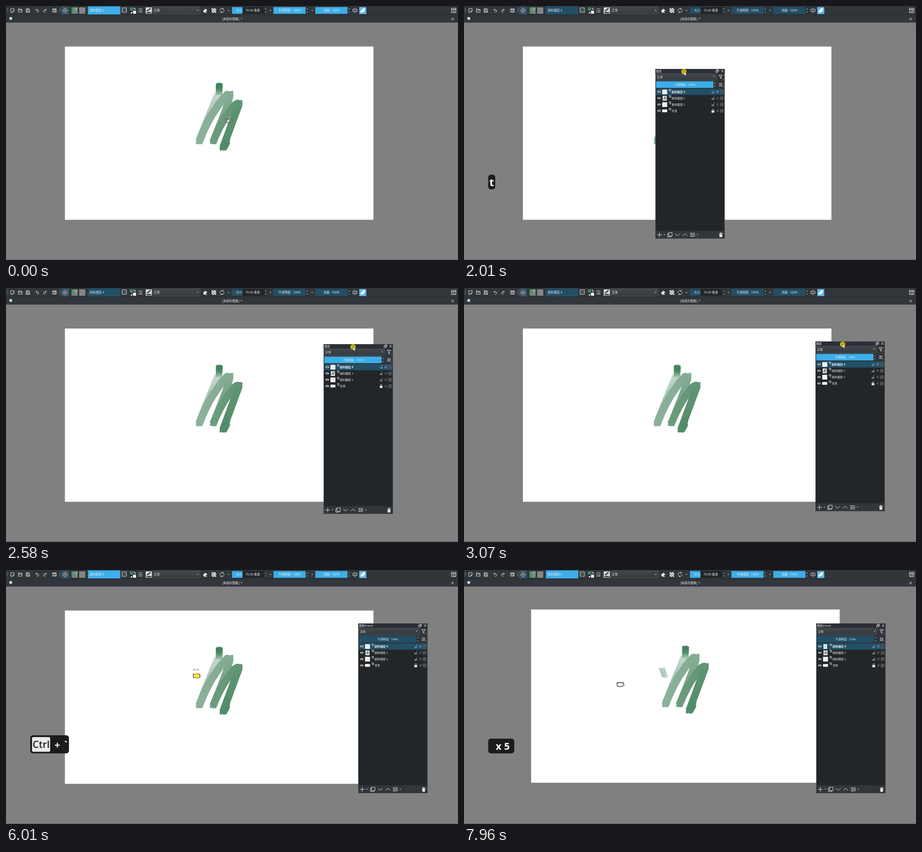
Recreate the animation shown at these times as an HTML page. Size 998 by 561 pixels, loop 8000 ms.

```html
<!DOCTYPE html>
<html lang="zh">
<head>
<meta charset="utf-8">
<style>
html,body{margin:0;width:100%;height:100%;overflow:hidden;background:#808080}
svg{display:block;width:100vw;height:100vh}
text{font-family:"Open Sans","Noto Sans CJK SC","Noto Sans CJK",sans-serif;font-size:6.6px;fill:#eff0f1;white-space:pre}
.i{fill:none;stroke:#e6e7e8;stroke-width:1}
.m{text-anchor:middle}
.s text{font-size:6.1px}
#keys text{font-weight:700;font-size:22px;fill:#fff}
#keys .cap{fill:#222;font-size:21.7px;font-weight:600}
</style>
</head>
<body>
<svg id="stage" viewBox="0 0 998 561" preserveAspectRatio="none"></svg>
<script>
const LOOP = 8000, DIM = '#224f66', LIT = '#3daee9';

let seed = 7;
const rnd = () => (seed = seed * 16807 % 2147483647) / 2147483647;

const rect = (x, y, w, h, fill, more = '') =>
  `<rect x="${x}" y="${y}" width="${w}" height="${h}" fill="${fill}" ${more}/>`;
const icon = (d, more = '') => `<path class="i" d="${d}" ${more}/>`;
const solid = (d, fill = '#e6e7e8', more = '') => `<path d="${d}" fill="${fill}" ${more}/>`;
const text = (x, y, s, more = '') => `<text x="${x}" y="${y}" ${more}>${s}</text>`;
const at = (x, y, s, more = '') => `<g transform="translate(${x} ${y})" ${more}>${s}</g>`;
const caret = (x, y, r = 2) => solid(`M${x - r} ${y - r / 2}h${2 * r}l${-r} ${r}z`, '#c8cacc');
const spinner = (x, y) => rect(x - 3, y - 7.5, 6, 15, '#2b3035') +
  solid(`M${x - 1.8} ${y - 2.6}l1.8 -2.2 1.8 2.2zM${x - 1.8} ${y + 2.6}l1.8 2.2 1.8 -2.2z`, '#b9bcbf');
const combo = (x, y, w, h) => rect(x, y, w, h, 'url(#combo)', 'rx="1.5" stroke="#5b6065" stroke-width=".7"');
const grip = x => icon(`M${x - 1} 5v10M${x + 1} 5v10`, 'stroke-dasharray="1 1" opacity=".45"');

function checker(x, y, cell, n, fill) {
  let d = '';
  for (let r = 0; r < n; r++)
    for (let c = r % 2; c < n; c += 2) d += `M${x + c * cell} ${y + r * cell}h${cell}v${cell}h${-cell}z`;
  return solid(d, fill);
}

const grad = (id, x1, y1, x2, y2, a, b, more = '') =>
  `<linearGradient id="${id}" gradientUnits="userSpaceOnUse" x1="${x1}" y1="${y1}" x2="${x2}" y2="${y2}">
   <stop offset="0" stop-color="${a}"/><stop offset="1" stop-color="${b}" ${more}/></linearGradient>`;

// A flat brush: parallel bristles with ragged ends; tall is the height of the tip.
function brush(d, paint, { half = 6.2, n = 11, width = 2.3, tall = 3 } = {}) {
  let out = '';
  for (let k = 0; k < n; k++) {
    const dx = (k / (n - 1) * 2 - 1) * half, jitter = (rnd() - .5) * 3;
    for (const side of [-tall, tall])
      out += `<path d="${d}" transform="translate(${dx.toFixed(2)} ${(jitter + side).toFixed(2)})"/>`;
  }
  return `<g fill="none" stroke="${paint}" stroke-width="${width}">${out}</g>`;
}

const defs = `<defs>
<linearGradient id="combo" x1="0" y1="0" x2="0" y2="1"><stop offset="0" stop-color="#41464b"/><stop offset="1" stop-color="#363b40"/></linearGradient>
<linearGradient id="swatch"><stop offset="0" stop-color="#468a61"/><stop offset="1" stop-color="#8f9691"/></linearGradient>
<pattern id="thumb" width="4" height="4" patternUnits="userSpaceOnUse"><rect width="4" height="4" fill="#fff"/><path d="M0 0h2v2h-2zM2 2h2v2h-2z" fill="#e3dbe1"/></pattern>
${grad('g0', 0, 178, 0, 198, '#42845c', '#6c9f80', 'stop-opacity="0"')}
${grad('g1', 0, 192, 0, 290, '#c8d9ce', '#8fb29d')}
${grad('g2', 0, 190, 0, 304, '#84ab93', '#8db19b')}
${grad('g3', 0, 190, 0, 304, '#86ad95', '#6b9c7e')}
${grad('g4', 0, 208, 0, 304, '#629575', '#6c9c7e')}
${grad('g5', 0, 208, 0, 318, '#629575', '#528c69')}
<clipPath id="reveal"><rect id="revealBox" x="408" y="210" width="30" height="0"/></clipPath>
</defs>`;

const drawing =
  brush('M468 196C461 214 443 256 426 301', 'url(#g1)') +
  brush('M471 170.500Q471 184 470 198', 'url(#g0)', { tall: 0 }) +
  brush('M426 301C437 272 448 249 462 229S484 197 494 192', 'url(#g2)') +
  brush('M494 191.500Q496 196 492 208C484 236 470 268 457 301', 'url(#g3)') +
  brush('M457 301C467 276 479 253 492 235S506 215 514 212', 'url(#g4)') +
  brush('M514.500 211.500Q516 216 511 227C501 254 490 284 478.500 315', 'url(#g5)') +
  brush('M479 315Q485 306 488 298', '#528c69') +
  `<g clip-path="url(#reveal)">${brush('M418.500 219L425 239.500', '#aecabb', { half: 5.6, n: 8, width: 1.5, tall: 0 })}</g>`;

const bar = (x, w, label) => rect(x, 2.3, w, 15, 'var(--tool)') +
  text(x + w / 2, 12.400, label, 'class="m"');

const toolbar =
  rect(0, 0, 998, 36.500, '#31363b') + rect(0, 19.300, 998, .8, '#24282c') + rect(0, 36, 998, .6, '#4a4f54') +
  grip(3) + grip(119) +
  icon('M10.500 6h7.500v5l-3 3h-4.500zM18 11h-3v3') +
  icon('M27.500 13.500v-7.500h3l1 1.500h4v6zM27.500 9h8') +
  icon('M44.500 6h6l1.500 1.500v6.500h-7.500zM46.500 6v2.500h3.500v-2.500M46 14v-3h4.500v3') +
  icon('M68.500 6l-2.500 2.500 2.500 2.500M66 8.500h3.500a2.600 2.600 0 0 1 0 5.200h-1.500', 'stroke-width="1.2"') +
  icon('M86.500 6l2.500 2.500 -2.500 2.500M89 8.500h-3.500a2.600 2.600 0 0 0 0 5.200h1.500', 'stroke-width="1.2"') +
  icon('M103 6.500h8v7h-8zM103 7.500h8M104.500 10h1.500M104.500 12h1.500M107 10h3M107 12h3') +
  rect(123, 2.500, 15, 15, '#29485a', 'stroke="#3f8db5" stroke-width=".8"') +
  '<circle cx="130.500" cy="10" r="4.700" class="i"/><circle cx="130.500" cy="10" r="2.300" fill="#e08b78"/>' +
  rect(144.500, 3, 13.500, 14, 'url(#swatch)') + checker(151.500, 3, 2.200, 3, '#a9afab66') + checker(151.500, 9.500, 2.200, 3, '#5e756888') +
  rect(161.500, 3, 13.500, 14, '#858585') +
  rect(180.800, 1, 71.700, 17.600, 'var(--tool)') + text(185, 12.400, '颜料图层 4') +
  icon('M256.500 4h9.500v10h-9.500z') + '<circle cx="261.200" cy="9" r="2.800" class="i" stroke-dasharray="1 1"/>' +
  rect(273.500, 3, 7, 7, '#45855f') + rect(280.500, 10.500, 6.500, 6.500, '#fff') +
  rect(274, 12, 4, 4, '#111') + rect(275.500, 13.500, 3, 3, '#fff') + icon('M282.500 5h2.500v3M283.500 3.500l-1.500 1.500 1.500 1.500M283.500 7l1.500 1.500 1.500 -1.500', 'stroke-width=".8"') +
  icon('M292 7h3l2 -1.500 2 1.500h2.500M294 10.500h7M292 10.500h1M294 13.500h7M292 13.500h1', 'stroke-width="1.2"') +
  rect(308.500, 3, 13.500, 14, '#d9d9d9') + solid('M310 11l7-6 3-1-1 3-6 5zM310 14q5-2 11 0v2h-11z', '#3c3f42') +
  combo(323.500, 2, 105, 16) + text(326.500, 12.400, '正常') + caret(423, 10) +
  solid('M435 11l5-5 4.500 3.500-5 5h-2z') + icon('M438 14.500h6') +
  rect(454, 5, 10, 10, '#777') + checker(454, 5, 2.500, 4, '#fff') +
  icon('M473 11.500a4.200 4.200 0 0 1 6.500 -5M481 8.500a4.200 4.200 0 0 1 -6.500 5M479.500 4.500v2.500h-2.500M474.500 15.500v-2.500h2.500', 'stroke-width="1.2"') + caret(491.500, 10) +
  rect(499, 2.300, 71.500, 15, '#232629') + rect(499, 2.300, 23, 15, 'var(--tool)') +
  text(508, 12.400, '大小:') + text(529, 12.400, '70.00 像素') + spinner(573.500, 10) + caret(584, 10) +
  bar(590.500, 71, '不透明度:  100%') + spinner(665, 10) + caret(676, 10) +
  bar(683, 71, '流量:  100%') + spinner(757.500, 10) +
  icon('M770.500 4.500v11M769 7h-3v5.500h3M772 7h3v5.500h-3') +
  rect(780, 2.300, 15.500, 15.500, '#62b9e6') + solid('M782.500 14.500l1-4 6-6 4 1.500-3 6.500-5 2z', '#f4f7f8') +
  icon('M983.500 5h10v9.500h-10zM983.500 7.500h10M987 7.500v7M990.500 7.500v7') +
  '<circle cx="10.500" cy="27.500" r="3.300" fill="#c4d9e8"/>' +
  text(477.500, 30.800, '[未保存图像]  *') + icon('M983.500 26l5 5.500M988.500 26l-5 5.500', 'stroke-width="1.1"');

function layerRow(i, name, thumb) {
  const y = 50.500 + 14 * i, locked = i === 3;
  return solid(`M4 ${y}q4-4.600 8 0q-4 4.600-8 0z`, '#f2f2f2') + `<circle cx="8" cy="${y}" r="1.500" fill="#232629"/>` + thumb(y) +
    icon(`M30 ${y - 5.500}h4v3.500l-2 1.500M30 ${y - 5.500}l1 3 2 1`, 'stroke-width=".8"') +
    text(36, y + 2.300, name, i ? '' : 'font-weight="700"') +
    (locked
      ? rect(124, y - .5, 6, 4.500, '#f2f2f2') + icon(`M125.300 ${y}v-2a1.700 1.700 0 0 1 3.400 0v2`)
      : rect(124, y, 6, 3.500, '#777c80') + icon(`M128.700 ${y}v-2a1.500 1.500 0 0 1 2 -1.500`, 'opacity=".5"')) +
    text(137, y + 2.500, 'α', `class="m" style="font-size:9px;font-style:italic;fill:${i ? '#80858a' : '#a9bac4'}"`) +
    rect(142.500, y - 4, 8, 8, '#656b70', 'rx="2"') + checker(143, y - 3.500, 1.750, 4, '#2c3136');
}
const clearThumb = y => rect(15, y - 5, 11, 10.500, 'url(#thumb)');
const topThumb = y => `<g id="blank">${clearThumb(y)}</g><g id="dabbed">` +
  rect(16, y - 5, 8, 10.500, '#f1f4f2') + solid(`M18 ${y - 3}l4 1 1 4-3 1z`, '#b9d0c2') + '</g>';
const strokeThumb = y => rect(16, y - 5, 9, 10.500, '#eef1ef') +
  icon(`M20.500 ${y - 4}l-3 7 4-6-1.500 6 3.500-5-2 6`, 'style="stroke:#4f7560"');
const whiteThumb = y => rect(15, y - 3, 11, 6, '#fff');

const panel = rect(0, 0, 153, 374.700, '#31363b') +
  rect(0, 0, 153, 10, '#2b3036') +
  text(1.500, 6.700, '图层', 'id="title"') +
  icon('M133 3.500h4v4h-4zM135 3.500v-2h4v4h-2', 'stroke-width=".9" transform="translate(.5 0)"') + icon('M145.500 2l4.500 5M150 2l-4.500 5', 'stroke-width=".9"') +
  combo(1, 10.500, 133.500, 14.500) + text(4, 19.700, '正常') + caret(129, 17) +
  icon('M140.500 13.500h7.500l-2.800 3.500v4.500l-1.900-1.500v-3z', 'stroke-width=".9"') + caret(150, 22.500, 1.200) +
  rect(1.500, 27.300, 126.500, 14.500, 'var(--panel)') + text(65, 37, '不透明度:  100%', 'class="m"') + spinner(131.500, 35) +
  icon('M140.500 32h7.500M140.500 34.700h7.500M140.500 37.400h7.500', 'stroke-width="1.1"') + caret(150, 40, 1.200) +
  rect(1, 43.300, 151, 314, '#232629') + rect(1, 57.700, 151, .4, '#2d3135') + rect(1, 43.700, 151, 13.800, DIM) +
  layerRow(0, '颜料图层 4', topThumb) + layerRow(1, '颜料图层 3', strokeThumb) +
  layerRow(2, '颜料图层 2', clearThumb) + layerRow(3, '背景', whiteThumb) +
  icon('M4 366.300h10M9 361.300v10', 'stroke-width="1.300"') + caret(20, 366) +
  icon('M29.500 361.500h7.500v7.500h-7.500zM29.500 363.500h-2.500v7.500h7.500v-2') +
  icon('M43.500 364l5.200 4.500 5.200-4.500M60 368.500l5.200-4.500 5.200 4.500', 'stroke-width="1.200"') +
  icon('M76.500 363h11M76.500 366.300h11M76.500 369.600h11M79 361.800v2.400M85 365v2.400M80 368.400v2.400', 'stroke-width="1.100"') + caret(93, 366) +
  solid('M140.500 363h8v1.200h-8zM143 361.500h3v1.500h-3zM141.100 365h6.800l-.6 6.500h-5.600z');

const arrow = solid('M0 0v8.500l2-1.800 1.400 3 1.500-.7-1.400-2.900h2.700z', '#fff', 'stroke="#222" stroke-width=".6"');
const outline = '<path d="M-7.500 -4l3 1.500 1.500-2 1.500 1.500 2.500-2 1.500 2 3-1.500 .5 2 1.500 .5-1.500 2 2 1.500-1 2-3 .5-1.500 1.500-3-1-2.500 1-2-1.500-3-.5 1-2-1-2.500z" fill="none" stroke="#e0f0e0" stroke-width="1.2" stroke-dasharray="5 .6"/>';
const hand = solid('M-3 0l.5-2.500 1.500 .5 .8-1.300 1.300 .8 1.500-.3 .8 2-.6 3h-4z', '#fff', 'stroke="#444" stroke-width=".7"');

const pill = (id, x, y, w, h, body) =>
  `<g id="${id}">${rect(x, y, w, h, '#1b1b1b', 'rx="6"')}${body}</g>`;

document.getElementById('stage').innerHTML = defs + rect(0, 0, 998, 561, '#808080') +
  at(0, 0, rect(130, 89.500, 681.300, 382.700, '#fff') + drawing, 'id="page"') +
  rect(0, 560, 998, 1, '#555a5e') + toolbar +
  at(0, 0, panel, 'id="dock" class="s"') +
  '<g id="keys">' +
  pill('keyT', 53.500, 372.500, 15.500, 32.500, text(61.200, 397.500, 't', 'class="m" style="font-size:24px"')) +
  pill('keyCtrl', 53.500, 365, 85.500, 40, rect(57.500, 369, 40, 32.500, '#e9e9e9', 'rx="3"') +
    text(77.500, 393, 'Ctrl', 'class="m cap"') + text(113.300, 393.500, '+', 'class="m"') + text(132, 393.500, '`', 'class="m"')) +
  pill('keySpace', 53.500, 372.500, 12.700, 32.500, '') +
  pill('keyRepeat', 53.500, 372.500, 57.500, 32.500, text(70, 397, 'x 5', 'id="count"')) + '</g>' +
  at(0, 0, outline, 'id="outline" style="mix-blend-mode:difference"') +
  at(0, 0, `<circle id="press" r="6" fill="#f4dc00" opacity=".75"/><g id="arrow">${arrow}</g><g id="hand">${hand}</g>`, 'id="mouse"');

const $ = id => document.getElementById(id);
const show = (id, on) => $(id).setAttribute('display', on ? 'inline' : 'none');
const move = (id, [x, y]) => $(id).setAttribute('transform', `translate(${x} ${y})`);
const ramp = (t, a, b) => Math.min(1, Math.max(0, (t - a) / (b - a)));

// Keys are [time, x, y].
function track(keys, t) {
  const i = keys.findIndex(k => k[0] > t);
  if (i < 0) return keys[keys.length - 1].slice(1);
  if (!i) return keys[0].slice(1);
  const [a, b] = [keys[i - 1], keys[i]], u = ramp(t, a[0], b[0]);
  return [a[1] + (b[1] - a[1]) * u, a[2] + (b[2] - a[2]) * u];
}

const dockPath = [[1680, 411, 139], [1900, 413, 139], [2010, 422.300, 139], [2200, 480, 148], [2410, 610, 151], [2460, 637, 143],
  [2580, 701, 124.200], [2740, 748, 119], [2900, 772, 117.500], [3070, 776, 118.200], [3280, 776.300, 118.200], [3450, 777.700, 118.200]];
const mousePath = [[30, 493, 253], [450, 483, 262], [780, 483, 262], [1050, 438, 200], [1250, 416, 162], [1490, 474, 146], [1620, 474, 145]];
const afterDrag = [[3700, 837, 124], [4030, 836, 150], [4110, 835, 160], [4440, 831, 182], [4980, 831, 183], [5160, 760, 190], [5420, 560, 212], [5760, 408, 228],
  [5950, 417, 220], [6040, 423, 240], [6110, 421, 219], [6200, 428, 240], [6300, 406, 257.500], [6560, 423, 256], [6700, 424, 255.800],
  [6780, 424, 255], [7100, 416, 251], [7430, 411, 250], [7750, 332, 247], [7960, 345.500, 252.500]];
const pagePath = [[6300, 0, 0], [6560, 17, -1.500], [6700, 18.200, -1.700], [6780, 18.200, -2.300]];

function pointer(t, dock) {
  if (t < 1680) return track(mousePath, t);
  if (t < 3700) return [dock[0] + (t < 2500 ? 63 : 65 - 5 * ramp(t, 2580, 3000)), dock[1] + 6];
  return track(afterDrag, t);
}

function draw(t) {
  const dock = track(dockPath, t), [x, y] = pointer(t, dock);
  const open = t >= 120, focused = t >= 1650 && t < 5840;
  const dragging = t >= 1650 && t < 3600, painting = t >= 5840 && t < 6210, panning = t >= 6300 && t < 6790;
  const overDock = open && x >= dock[0] && x <= dock[0] + 153 && y >= dock[1];

  const style = $('stage').style;
  style.setProperty('--tool', focused ? DIM : LIT);
  style.setProperty('--panel', focused ? LIT : DIM);

  move('page', track(pagePath, t));
  move('dock', dock);
  show('dock', open);
  $('title').textContent = t < 4200 ? '图层' : '图层(Fixed)';
  show('blank', t < 7000);
  show('dabbed', t >= 7000);
  $('revealBox').setAttribute('height', 40 * ramp(t, 5930, 6200));

  move('mouse', [x, y]);
  move('outline', [x, y]);
  show('arrow', overDock);
  show('hand', panning);
  show('outline', !overDock && !panning);
  show('press', dragging || painting || panning);
  $('press').setAttribute('r', panning ? 5 : 6);

  show('keyT', t >= 150 && t < 2560);
  $('keyT').setAttribute('opacity', 1 - ramp(t, 2360, 2560));
  show('keyCtrl', t >= 4150 && t < 6260);
  show('keySpace', t >= 6260 && t < 6730);
  show('keyRepeat', t >= 6730);
  $('count').textContent = 'x ' + Math.min(5, 2 + Math.max(0, Math.floor((t - 6730) / 35)));
}

const start = performance.now();
function frame() {
  draw((performance.now() - start) % LOOP);
  requestAnimationFrame(frame);
}
frame();
</script>
</body>
</html>
```
